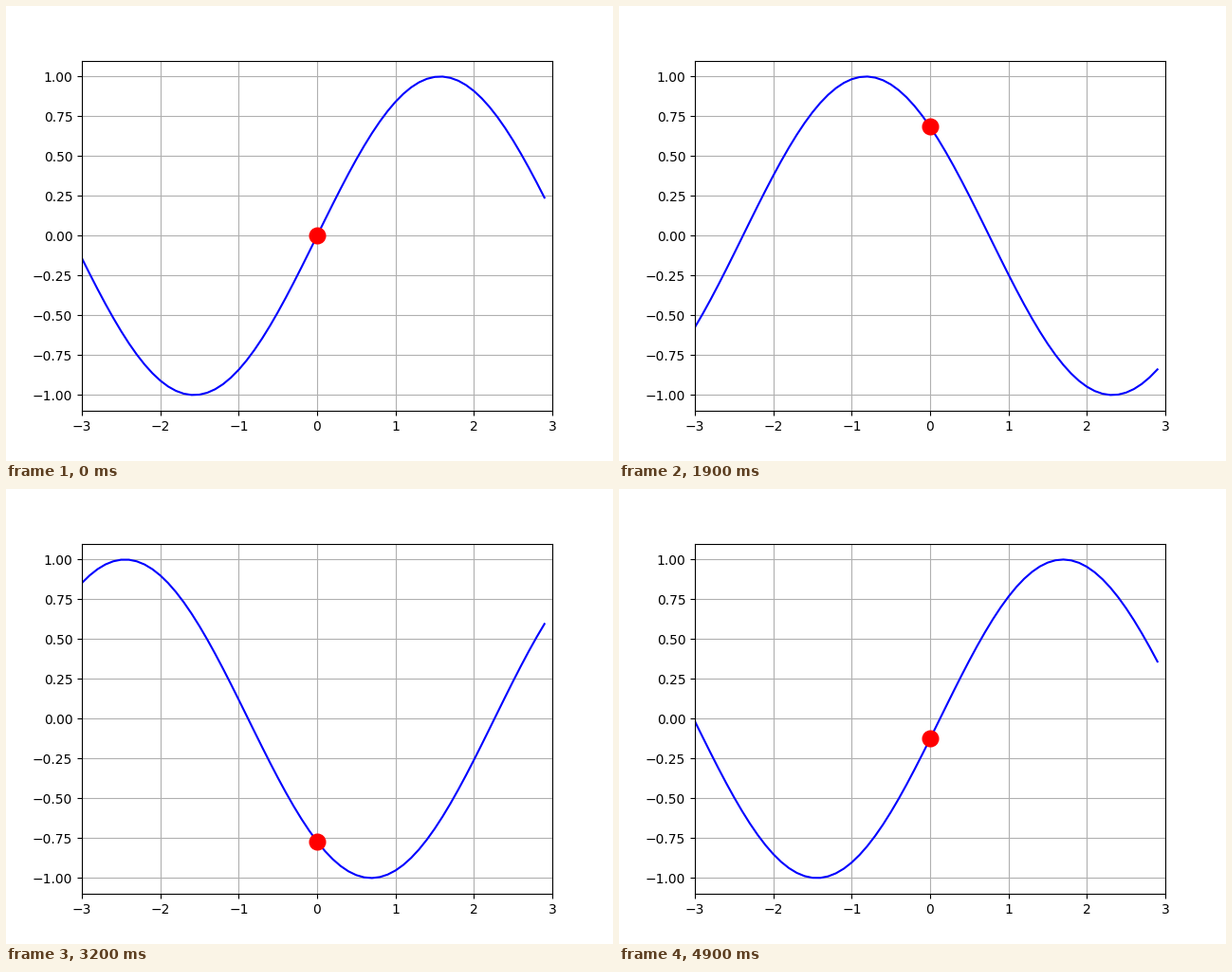
Animation, 640 px wide and 480 px high, one loop 5000 ms. Source, as a matplotlib script:

```python
import numpy as np
import matplotlib.pyplot as plt
from matplotlib.animation import FuncAnimation

FRAMES = 50
INTERVAL = 100

x = np.arange(-3, 3, 0.1)

fig, ax = plt.subplots(figsize=(6.4, 4.8), dpi=100)
ax.set_xlim(-3, 3)
ax.set_ylim(-1.1, 1.1)
ax.grid(True)

wave, = ax.plot(x, np.sin(x), "b-")
dot, = ax.plot([0], [0], "ro", markersize=12)


def update(frame):
    """Shift the wave left; the dot rides it at x = 0."""
    phase = 2 * np.pi * frame / FRAMES
    wave.set_ydata(np.sin(x + phase))
    dot.set_ydata([np.sin(phase)])
    return wave, dot


anim = FuncAnimation(fig, update, frames=FRAMES, interval=INTERVAL, repeat=True)
plt.show()
```
